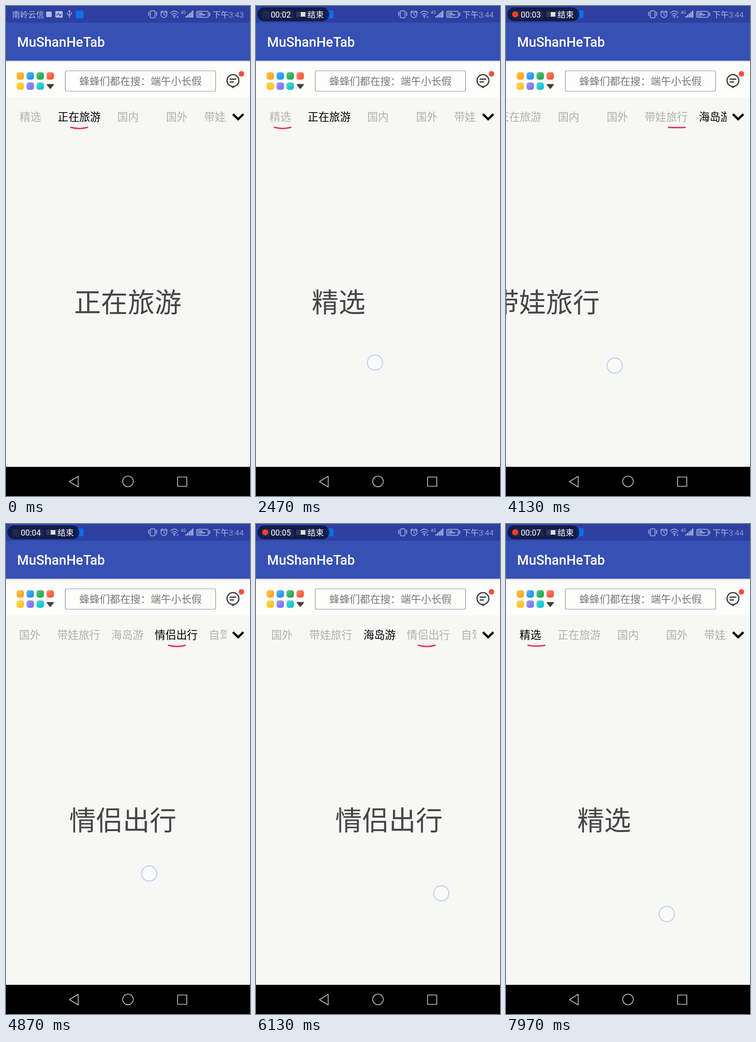
An HTML page for the animation above (8000 ms loop, 529 by 1058 pixels).

```html
<!DOCTYPE html>
<html lang="zh-CN">
<head>
<meta charset="utf-8">
<style>
  html, body { margin: 0; width: 100%; height: 100%; overflow: hidden; background: #f7f7f6; }
  svg { display: block; width: 100%; height: 100%; }
  text { font-family: Roboto, "Noto Sans CJK SC", "Noto Sans CJK", sans-serif; }
  .line { fill: none; stroke-linecap: round; stroke-linejoin: round; }
  .mid { text-anchor: middle; }
  .thin { font-weight: 350; }
</style>
</head>
<body>
<svg viewBox="0 0 529 1058">
  <defs>
    <clipPath id="strip"><rect y="200" width="478" height="90"/></clipPath>
    <linearGradient id="shade" x2="0" y2="1">
      <stop stop-color="#b9bac2"/><stop offset="1" stop-color="#fff"/>
    </linearGradient>
    <linearGradient id="sheen" x2="1" y2="1">
      <stop stop-color="#fff" stop-opacity=".28"/><stop offset=".7" stop-color="#fff" stop-opacity="0"/>
    </linearGradient>
  </defs>
  <rect width="529" height="1058" fill="#f7f7f6"/>
  <rect y="117" width="529" height="80" fill="#fdfdfc"/>
  <rect y="117" width="529" height="5" fill="url(#shade)"/>
  <rect width="529" height="118" fill="#3650b4"/>
  <rect width="529" height="36" fill="#2d40a2"/>
  <text x="24" y="87.5" font-size="29" font-weight="500" fill="#fff">MuShanHeTab</text>

  <!-- status bar -->
  <g fill="#b4bce4" font-size="17.4">
    <text class="thin" x="13" y="24.5">南岭云信</text>
    <rect x="87" y="12" width="12" height="12" rx="2"/>
    <rect x="107" y="11" width="16" height="14" rx="2"/>
    <path class="line" d="M109 19h3l2-4 3 7 2-4h2" stroke="#2d40a2" stroke-width="1.5"/>
    <g class="line" stroke="#b4bce4" stroke-width="1.4">
      <path d="M137.500 10v15M133 15v3l4.500 3M142 14v3l-4.500 3M136 12l1.500-2 1.500 2"/>
      <rect x="313" y="10.500" width="10" height="15" rx="1.500"/>
      <path d="M310.500 13l-2 2 2 2-2 2 2 2M325.500 13l2 2-2 2 2 2-2 2"/>
      <circle cx="342.500" cy="18.500" r="6.500"/>
      <path d="M342.500 14.500v4l3 2M335 14l4-4M350 14l-4-4"/>
      <path d="M356.500 15q8.500-8 17 0M359.500 18.500q5.500-5 11 0M362 21.500q3-2.500 6 0"/>
      <rect x="413.500" y="11.500" width="25" height="13" rx="2"/>
      <path d="M441.500 15v6" stroke-width="2"/>
    </g>
    <circle cx="365" cy="24" r="1.500"/>
    <path d="M373 25h-3l3-4z"/>
    <text x="379" y="17" font-size="9">4G</text>
    <path d="M389 22h2.500v3h-2.500zM392.700 19h2.500v6h-2.500zM396.400 16h2.500v9h-2.500zM400 13h2.500v12h-2.500zM403.500 10h2.500v15h-2.500z"/>
    <rect x="415" y="13" width="10" height="10" fill-opacity=".45"/>
    <path d="M419 17.500l7-2v2l8 1-7 2.500v-2z"/>
    <text class="thin" id="clock" x="448" y="24.500"></text>
  </g>
  <rect x="151" y="9.500" width="17" height="17" rx="2" fill="#0b6fe8"/>
  <g id="pill">
    <rect x="3" y="3" width="156" height="30" rx="15" fill="#0b1130" fill-opacity=".78"/>
    <path id="dot" d="M20 11l6.300 3.500v7L20 25l-6.300-3.500v-7z" fill="#f5401e"/>
    <g fill="#fff" font-size="17.500">
      <text id="timer" x="32" y="24.500"></text>
      <text x="112" y="24.500">结束</text>
    </g>
    <rect x="97" y="13" width="10" height="10" fill="#dcdde2"/>
  </g>

  <!-- search header -->
  <g id="grid"></g>
  <path d="M89.500 168.500h13q2 0 1 2l-6.500 8q-1 1-2 0l-6.500-8q-1-2 1-2z" fill="#45413f"/>
  <rect x="128.500" y="140" width="326" height="44" rx="3" fill="#fdfdfc" stroke="#8e89a6" stroke-width="1.200"/>
  <text class="thin" x="159" y="170" font-size="22.100" fill="#777">蜂蜂们都在搜：端午小长假</text>
  <g class="line" stroke="#444" stroke-width="2.800">
    <circle cx="492" cy="161" r="12.800"/>
    <path d="M486 158h12M486 164h7"/>
    <path d="M489.500 174.500h5l-2.500 2z" stroke-width="2"/>
  </g>
  <circle cx="510.500" cy="146.500" r="6" fill="#fb4f3b"/>

  <!-- tabs and pages -->
  <g clip-path="url(#strip)">
    <g id="tabs" class="mid thin" font-size="23.300"></g>
    <path id="mark" class="line" stroke="#e2345a" stroke-width="3"/>
  </g>
  <path d="M492 233.500l11.300 11 11.300-11" fill="none" stroke="#000" stroke-width="4.800"/>
  <g id="pages" class="mid thin" font-size="58.200" fill="#464646"></g>
  <circle id="finger" r="16.500" fill="#fff" fill-opacity=".35" stroke="#c3cfea" stroke-width="2.200"/>

  <!-- navigation bar -->
  <rect y="995" width="529" height="63" fill="#000"/>
  <g fill="none" stroke="#c4c4c4" stroke-width="1.700" stroke-linejoin="round">
    <path d="M137.500 1027l19-11.500v23z"/>
    <circle cx="264.500" cy="1026.500" r="11.500"/>
    <rect x="372" y="1017" width="20" height="20"/>
  </g>
</svg>
<script>
const LOOP = 8000, W = 529, TAB = W / 5, SETTLE = 450, LAG = 14;
const $ = id => document.getElementById(id);
const clamp = x => Math.max(0, Math.min(1, x));
const names = ['精选', '正在旅游', '国内', '国外', '带娃旅行', '海岛游', '情侣出行', '自驾游'];

function add(parent, tag, attrs, label = '') {
  const el = document.createElementNS('http://www.w3.org/2000/svg', tag);
  for (const k in attrs) el.setAttribute(k, attrs[k]);
  el.textContent = label;
  parent.append(el);
  return el;
}

['#fdab1c', '#2498ee', '#25ad58', '#fb5c3c', '#fdc628', '#7d76f5', '#14c6ce'].forEach((fill, i) => {
  const box = { x: 23 + i % 4 * 21.6, y: i < 4 ? 143 : 165, width: 16, height: 16, rx: 5 };
  add($('grid'), 'rect', { ...box, fill });
  add($('grid'), 'rect', { ...box, fill: 'url(#sheen)' });
});
const tabs = names.map((n, i) => add($('tabs'), 'text', { x: TAB * (i + .5), y: 248.3 }, n));
names.forEach((n, i) => add($('pages'), 'text', { x: W * (i + .5) - .5, y: 661.3 }, n));

// A swipe drags a little, then the page flings to rest.
const swipe = (start, dir, extra) => ({
  start, dir, drag: 100, share: .05, lead: 40,
  ...(dir > 0 ? { from: [382, 734], to: [230, 778], slide: 136 }
              : { from: [245, 758], to: [406.5, 798.5], slide: 100 }),
  ...extra
});
const swipes = [
  swipe(1420, -1, { drag: 300, share: .3, slide: 300, lead: 150, from: [231.5, 738], to: [400, 770] }),
  ...[2360, 2777, 3194, 3597, 4000, 4403, 4807].map(s => swipe(s, 1)),
  ...[5700, 6034, 6350, 6664, 7009, 7357].map(s => swipe(s, -1)),
  swipe(7706, -1, { from: [190, 800], to: [348.5, 842] })
];

function progress(s, t) {
  const age = t - s.start;
  if (age < s.drag) return s.share * clamp(age / s.drag) ** 2;
  return 1 - (1 - s.share) * (1 - clamp((age - s.drag) / SETTLE)) ** 5;
}
const position = t => swipes.reduce((p, s) => p + s.dir * progress(s, t), 1);

function draw(t) {
  const late = position(t - LAG);
  const scroll = Math.min(Math.max(0, late - 3) * TAB, TAB * names.length - 478);
  // The next tab lights up shortly before the fling begins.
  const selected = swipes.reduce((n, s) => n + (t >= s.start + s.drag - 10 ? s.dir : 0), 1);
  $('pages').setAttribute('transform', `translate(${-position(t) * W})`);
  $('tabs').setAttribute('transform', `translate(${-scroll})`);
  tabs.forEach((el, i) => el.setAttribute('fill', i === selected ? '#000' : '#b0b0ae'));

  const x = TAB * (late + .5) - scroll, bend = 5 * Math.cos(2 * Math.PI * late);
  $('mark').setAttribute('d', `M${x - 18} 262q18 ${bend} 36 0`);

  const s = swipes.findLast(s => t >= s.start - s.lead);
  const end = s && s.start + s.drag + 195;
  $('finger').style.opacity = s ? clamp((end - t) / 15) : 0;
  if (s) {
    const k = clamp((t - s.start) / s.slide);
    ['cx', 'cy'].forEach((a, i) => $('finger').setAttribute(a, s.from[i] + (s.to[i] - s.from[i]) * k));
  }

  const sec = Math.max(0, (t - 370) / 1000);
  $('pill').style.opacity = clamp((t - 10) / 200);
  $('timer').textContent = '00:0' + Math.floor(sec);
  $('dot').style.opacity = sec % 1 > .53 ? 1 : 0;
  $('clock').textContent = t < 30 ? '下午3:43' : '下午3:44';
}

const begin = performance.now();
function tick() {
  draw((performance.now() - begin) % LOOP);
  requestAnimationFrame(tick);
}
tick();
</script>
</body>
</html>
```
